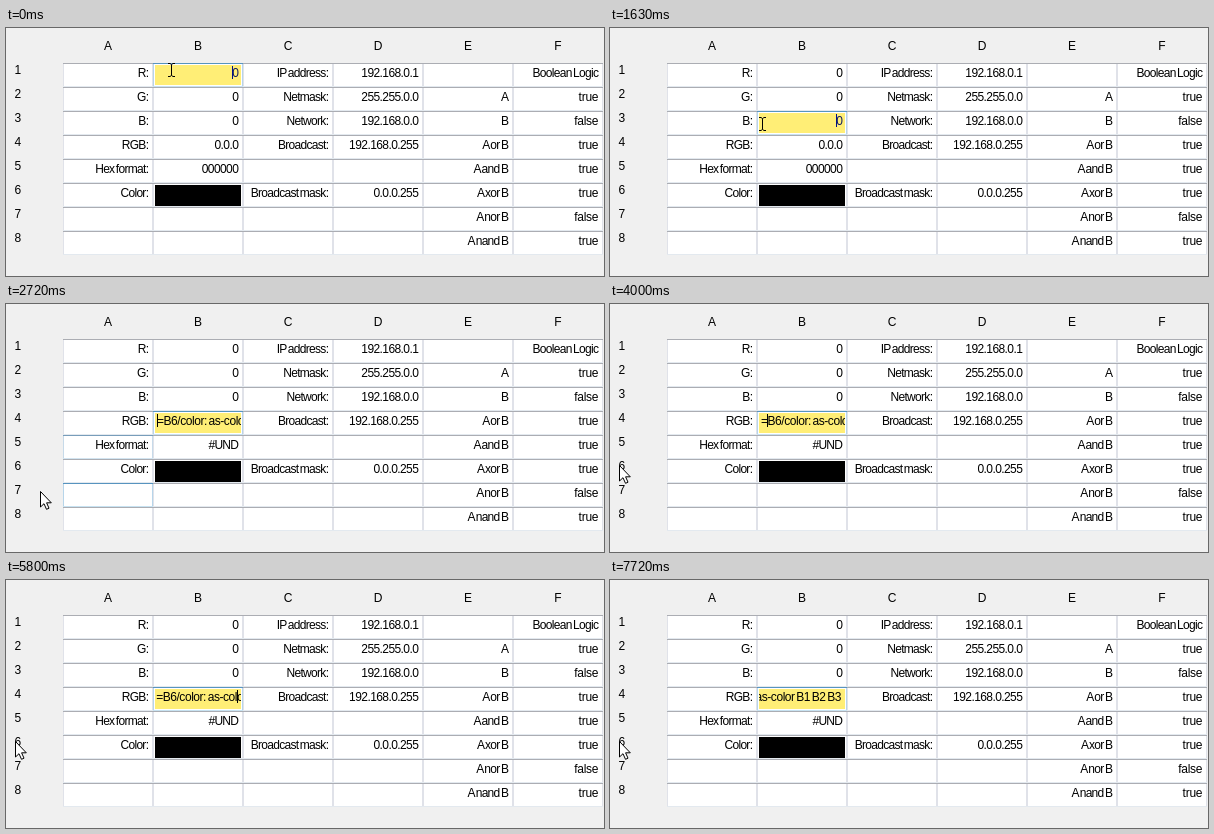
An HTML page that plays this animation: 598 by 248 pixels, repeating every 8 s.

```html
<!DOCTYPE html>
<html lang="en">
<head>
<meta charset="utf-8">
<title>Spreadsheet</title>
<style>
  html, body { margin: 0; width: 100%; height: 100%; overflow: hidden; background: #f0f0f0; }
  svg { display: block; width: 598px; height: 248px; }
  text { font: 12px "Liberation Sans", Arial, sans-serif; white-space: pre; }
  .label { letter-spacing: -.7px; word-spacing: -1.2px; }
  .number { letter-spacing: -.58px; }
  .bool { letter-spacing: -.25px; }
  .formula { letter-spacing: -.45px; word-spacing: -1.2px; }
</style>
</head>
<body>
<svg id="stage" viewBox="0 0 598 248"></svg>
<script>
const LOOP = 8000, LEFT = 57, TOP = 35, CELL_W = 90, CELL_H = 24;
const FORMULA = "=B6/color: as-color B1 B2 B3";
const columns = [
  ["R:", "G:", "B:", "RGB:", "Hex format:", "Color:"],
  ["0", "0", "0", "0.0.0", "000000"],
  ["IP address:", "Netmask:", "Network:", "Broadcast:", "", "Broadcast mask:"],
  ["192.168.0.1", "255.255.0.0", "192.168.0.0", "192.168.0.255", "", "0.0.0.255"],
  ["", "A", "B", "A or B", "A and B", "A xor B", "A nor B", "A nand B"],
  ["Boolean Logic", "true", "false", "true", "true", "true", "false", "true"]
];

// Each track is a list of [start time, ...values], held until the next entry.
const focusTrack = [[0, 0], [850, 1], [1630, 2], [2450, 3]];
const blinkTrack = [[0, 1], [570, 0], [850, 1], [1360, 0], [1630, 1], [2150, 0],
  [2450, 1], [2960, 0], [3470, 1], [7720, 0]];
const pointerTrack = [
  [0, 165, 35, "beam"], [300, 162, 45, "beam"], [435, 154, 60, "beam"], [520, 152, 66, "beam"],
  [970, 152, 73, "beam"], [1100, 152, 83, "beam"], [1230, 152, 89, "beam"],
  [1780, 152, 96, "beam"], [1900, 152, 106, "beam"], [2030, 152, 112, "beam"],
  [2570, 85, 156, "beam"], [2720, 34, 187, "arrow"], [2870, 18, 172, "arrow"], [3100, 9, 161, "arrow"]
];
const caretTrack = [[0, 0], [4000, 1], [4580, 2], [4720, 4], [4860, 6], [5000, 8], [5135, 10],
  [5275, 12], [5410, 14], [5550, 15], [5670, 16], [5800, 17], [5950, 18], [6080, 20], [6210, 21],
  [6340, 22], [6620, 23], [6760, 24], [6890, 26], [7030, 27], [7170, 28]];

const stage = document.getElementById("stage");
const at = (track, t) => track.findLast(entry => entry[0] <= t).slice(1);
const cellX = col => LEFT + col * CELL_W;
const cellY = row => TOP + row * CELL_H;

function add(tag, attrs, parent = stage) {
  const node = document.createElementNS("http://www.w3.org/2000/svg", tag);
  for (const key in attrs) node.setAttribute(key, attrs[key]);
  return parent.appendChild(node);
}
function rect(x, y, width, height, fill, parent) {
  return add("rect", { x, y, width, height, fill }, parent);
}
function text(content, x, y, attrs = {}) {
  const node = add("text", { x, y, ...attrs });
  node.textContent = content;
  return node;
}
function frame(col, row, [top, side, bottom]) {
  const group = add("g", {}), x = cellX(col), y = cellY(row);
  rect(x, y, 1, CELL_H, side, group);
  rect(x + CELL_W - 1, y, 1, CELL_H, side, group);
  rect(x, y + CELL_H - 1, CELL_W, 1, bottom, group);
  rect(x, y, CELL_W, 1, top, group);
  return group;
}
const GRAY = ["#abadb3", "#e0e2e9", "#e3e9ef"];
const BLUE = ["#5794bf", "#b7d5ea", "#c7e2f1"];

for (let col = 0; col < 6; col++) {
  for (let row = 0; row < 8; row++) {
    rect(cellX(col), cellY(row), CELL_W, CELL_H, "#fff");
    frame(col, row, GRAY);
  }
}
rect(149, 157, 86, 21, "#000");

const focusFrames = [0, 1, 2, 3].map(row => frame(1, row, BLUE));
const hoverFrames = [4, 6].map(row => frame(0, row, BLUE));
const highlight = rect(149, 0, 86, 20, "#ffee76");

const cells = columns.map((column, col) => column.map((content, row) => {
  const kind = /^\d/.test(content) ? "number" : /true|false/.test(content) ? "bool" : "label";
  return text(content, cellX(col + 1) - 4.7, cellY(row) + 14, { class: kind, "text-anchor": "end" });
}));
[..."ABCDEF"].forEach((name, col) => text(name, cellX(col) + 45, 22, { "text-anchor": "middle" }));
for (let row = 0; row < 8; row++) text(row + 1, 8.5, cellY(row) + 11);

const clip = add("clipPath", { id: "editor" });
rect(149, 109, 86, 20, "#000", clip);
const editor = add("g", { "clip-path": "url(#editor)" });
const formula = text(FORMULA, 151, 121, { class: "formula" });
editor.append(formula);
const caret = rect(0, 0, 1, 13, "#000");

const pointers = {
  beam: add("path", { d: "M-3 .5H-1L.5 1.5 2 .5H4M.5 1.5V12.5M-3 13.5H-1L.5 12.5 2 13.5H4", fill: "none", stroke: "#000" }),
  arrow: add("path", { d: "M.5 .5V16L4 12.7 6.5 18.3 9 17.2 6.6 11.8H11.3Z", fill: "#fff", stroke: "#000" })
};

const show = (node, visible) => node.setAttribute("visibility", visible ? "visible" : "hidden");

function draw(t) {
  const [focus] = at(focusTrack, t);
  const [blink] = at(blinkTrack, t);
  const [caretIndex] = at(caretTrack, t);
  const [x, y, shape] = at(pointerTrack, t);
  const editing = focus === 3;

  highlight.setAttribute("y", cellY(focus) + 2);
  focusFrames.forEach((node, row) => show(node, row === focus));
  hoverFrames.forEach((node, i) => {
    node.setAttribute("opacity", t < 2720 || t >= 3230 ? 0 : (t < 2960 ? 1 : .5) * (i ? 1 : .6));
  });

  cells[1].slice(0, 3).forEach((node, row) => node.setAttribute("fill", row === focus ? "#101c60" : "#000"));
  show(cells[1][3], !editing);
  show(formula, editing);
  const hex = cells[1][4];
  hex.textContent = editing ? "#UND" : "000000";
  hex.setAttribute("class", editing ? "label" : "number");

  let caretX = 226;
  if (editing) {
    const end = 151 + (caretIndex ? formula.getSubStringLength(0, caretIndex) : 0);
    const scroll = Math.min(0, 231 - end);
    formula.setAttribute("x", 151 + scroll);
    caretX = Math.floor(end + scroll);
  }
  caret.setAttribute("x", caretX);
  caret.setAttribute("y", cellY(focus) + 3);
  caret.setAttribute("fill", editing ? "#000" : "#001189");
  show(caret, blink);

  for (const name in pointers) show(pointers[name], name === shape);
  pointers[shape].setAttribute("transform", `translate(${x} ${y})`);
}

function tick() {
  draw(performance.now() % LOOP);
  requestAnimationFrame(tick);
}
tick();
</script>
</body>
</html>
```
